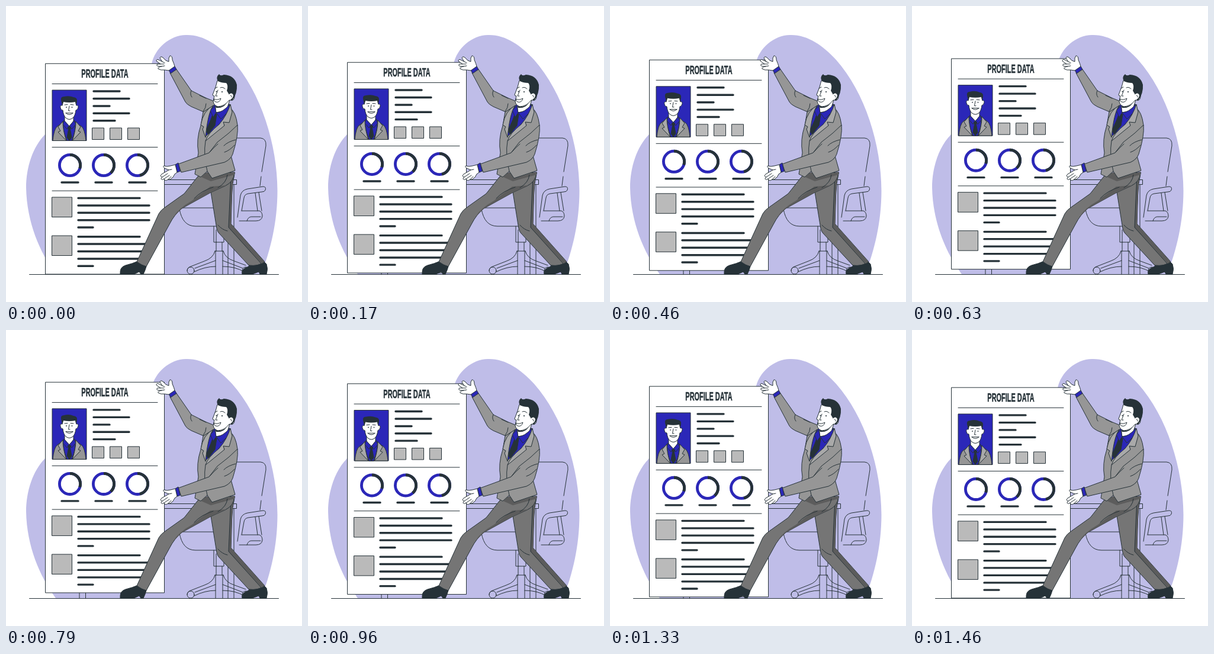
An HTML page that plays this animation: 500 by 500 pixels, repeating every 1.5 s.

```html
<!DOCTYPE html>
<html lang="en">
<head>
<meta charset="utf-8">
<title>Profile data</title>
<style>
  html, body { margin: 0; width: 100%; height: 100%; overflow: hidden; background: #fff; }
  svg { display: block; width: 100%; height: 100%; }
  .ln { fill: none; stroke: #263238; stroke-width: 1; stroke-linecap: round; stroke-linejoin: round; }
  .sh { stroke: #263238; stroke-width: 1; stroke-linejoin: round; }
  .white { fill: #fff; }
  .blue { fill: #2b27b8; }
  .suit { fill: #969696; }
  .lapel { fill: #a9a9a9; }
  .pants { fill: #757575; }
  .shade { fill: #5c5c5c; }
  .box { fill: #bababa; }
  .dark { fill: #263238; }
  .bar { fill: none; stroke: #263238; stroke-width: 3.4; stroke-linecap: round; }
  .ring { fill: none; stroke-width: 4.8; }
  text { font: 700 20.5px "Liberation Sans", Arial, sans-serif; fill: #263238; text-anchor: middle; stroke: #263238; stroke-width: .5; }
</style>
</head>
<body>
<svg viewBox="0 0 500 500">
  <path fill="#bfbde8" d="M304 49C277 49 251 72 246 98C230 170 110 165 66 217C45 238 34 273 34 307C35 365 57 416 84 453H431C447 412 458.500 365 458.500 312C458.500 235 431 146 382 91C359 66 333 48 304 49Z"/>

  <g class="ln" id="office">
    <path d="M268 293.500H389.500V301.500H268M124 440V453M134.500 440V453M375 302V453M385 302V453"/>
    <path d="M386 223H430Q440 224 439 236L432 280M431 288L429 304"/>
    <path d="M391 357L396 320Q398 311 408 309L434 305Q440 305 438 311Q437 314 432 314L409 317Q403 318 402 324L398 346"/>
    <path d="M427 315L432 346M421 316L425 346M398 346H428Q433 348 433 355Q432 363 422 363H394M407 363Q409 355 417 356H430"/>
    <path d="M286 341H356M293 343Q298 372 320 372H384M351 372V399H368V372M355 378V399M355 399V414M365 399V414"/>
    <path d="M353 414Q350 426 335 431L312 440Q306 442 306 447M367 414Q370 426 386 431L405 438M354 430L319 443M366 430L400 443M353 414H367M354 414V453M366 414V453M318 449Q336 440 354 440M366 440Q388 440 402 449"/>
    <circle cx="312" cy="447" r="6"/><circle cx="405" cy="447" r="6"/>
  </g>

  <g id="panel">
    <rect class="sh white" x="66.500" y="97.300" width="201" height="355.700"/>
    <text transform="translate(167 121.200) scale(.535 1)">PROFILE DATA</text>
    <path class="ln" d="M78 131.500H256M78 238.500H256M78 312.200H256"/>

    <g id="portrait">
      <rect class="sh blue" x="78" y="142" width="58" height="85.500"/>
      <path class="sh suit" d="M79 227.500Q81 207 87 203L97 196H116L127 203Q133 207 135 227.500Z"/>
      <path class="sh blue" d="M97 194Q94 206 103 227.500H111Q120 206 116 194Z"/>
      <path class="sh white" d="M99 184V195L107 203L114 195V184Z"/>
      <path class="sh blue" d="M98 193L96 200L103 208L107 203L111 208L118 200L115 193L107 203Z"/>
      <path class="sh dark" d="M104.500 204H109.500L108.500 209L111 222L107 227.500L103 222L105.500 209Z"/>
      <path class="sh lapel" d="M96 195L88 204L92 211L88 213L102 227.500Q96 210 96 195ZM118 195L126 204L122 211L126 213L112 227.500Q118 210 118 195Z"/>
      <path class="sh white" d="M95 168Q91 167 92 172Q93 177 96 176Q97 185 101 189Q107 194 113 189Q117 185 118 176Q121 176 122 171Q122 167 119 168L117 159H97Z"/>
      <path class="dark" d="M95 169L93 159Q92 153 98 153Q107 151 114 154Q121 155 120 161L118.500 169L117 162Q107 164 97 162Z"/>
      <path class="ln" d="M99 167L104 166.500M109 166.500L114 167M107 169L105.500 177H108M101 181Q107 186 113 181Z"/>
      <circle class="dark" cx="102" cy="171" r=".9"/><circle class="dark" cx="111.500" cy="171" r=".9"/>
    </g>

    <path class="bar" d="M148 144H192M148 156.500H208M148 169H175M148 181.300H208M148 193.700H184"/>
    <path class="sh box" d="M145.500 206h20v19.500h-20zM175.500 206h20v19.500h-20zM205.500 206h20v19.500h-20z"/>
    <g id="rings"></g>
    <path class="bar" d="M94 298H122M151 298H179M208 298H236"/>
    <path class="sh box" d="M77.500 323h34v33.500h-34zM77.500 388h34v33.500h-34z"/>
    <path class="bar" d="M122 324.500H226M122 337H242M122 349.300H242M122 361.700H242M122 374H147M122 389.700H226M122 402H242M122 414.500H242M122 427H242M122 439.200H147"/>
  </g>

  <path class="ln" d="M39.500 453.500H460.500"/>

  <g id="man">
    <path class="sh dark" d="M223 431Q214 435 202 438Q193 441 193 449V453H216L225 449L228 453H232Q235 447 237 440Z"/>
    <path class="sh dark" d="M434 430L440 436Q443 444 440 453H429L427 449L416 453H399Q397 446 405 442Q412 440 411 436Z"/>
    <path class="sh pants" d="M346 284L386.500 281Q382 300 381.500 320L380 368L437 432Q426 440 410 438L360 384Q356 380 355 370L346 314Z"/>
    <path class="shade" d="M380 283L386 281.500Q382 300 381.500 320L380 368L436.500 432L432 435L376 374Z"/>
    <path class="ln" d="M380 284L376 374L431 435"/>
    <path class="sh pants" d="M328 283L386 281Q385 297 370 304L346 315L297 342Q284 353 277 367L237 440Q229 438 221 432L258 351Q261 345 270 339L301 317Z"/>
    <path class="shade" d="M283 356Q292 341 314 329L345 305L372 303L346 315L297 342Z"/>
    <path class="shade" d="M330 289L340 280L348 291L386 280V285L346 296Z"/>
    <path class="ln" d="M318 325Q330 312 350 306M374 285Q373 298 358 307M358 370Q365 378 374 380"/>

    <path class="sh suit" d="M288 107L313 143L337 155L359 164L352 192L334 179L313 170Q305 166 303 162L277 113Z"/>
    <path class="ln" d="M313 143Q310 149 314 154M327 151L338 156M333 178Q338 172 338 165"/>

    <path class="sh suit" d="M357 164L378 172Q388 178 391 201Q387 232 380 253L387 278L348 291L340 279L329 289L319 284L325 248Q321 226 329 202L333 179Z"/>
    <path class="sh blue" d="M352 167L341 180L337 220L347 212L374 190L378 166Z"/>
    <path class="sh dark" d="M350 181L356 183L353 202L341 217L338 210L346 192Z"/>
    <path class="sh white" d="M358 160L354 170L354 180L372 177L379 156Z"/>
    <path class="dark" d="M354 168Q362 173 372 165Q367 173 355 172Z"/>
    <path class="sh blue" d="M353 169L345 176L350 188L355 180ZM355 180L363 191L376 178L378 166Q366 180 355 180Z"/>
    <path class="sh lapel" d="M379 166L382 179L377 197L367 196L369 202L337 228Q341 215 360 200Q373 185 379 166ZM350 168Q341 180 337 222L332 208L334 204L329 201Q333 177 350 168Z"/>
    <path class="ln" d="M337 228Q333 252 340 279"/>

    <path class="sh suit" d="M391 201Q393 218 383 250Q380 259 369 264L296 281L291 267L343 248L357 230L376 215Z" stroke="none"/>
    <path class="ln" d="M388 226Q375 229 368 236M358 233Q350 240 344 247M386 235Q378 244 369 247"/>

    <path class="sh blue" d="M275 108L285 102L288 107L278 114ZM286 268L291 265L294.500 279L289 281Z"/>
    <path class="sh white" d="M275 109L268 108Q261 109 257 106Q256 103 263 102L257 102Q253 100 256 98L261 98L254 93Q254 89 258 91L264 94L260 88Q261 84 265 87L270 92L275 94Q274 87 277 84Q281 84 281 91Q284 98 285 102Z"/>
    <path class="ln" d="M263 102L268 101M261 98L267 98M264 94L268 96"/>
    <path class="sh white" d="M286 268L278 270Q271 272 267 270Q264 271 268 274L275 277L263 284Q259 288 264 289L262 291Q262 295 267 292L268 294Q270 296 274 293L277 293Q283 290 285 284L289 281Z"/>
    <path class="ln" d="M264 289L273 283M267 292L276 286M274 293L279 288M275 277L280 276"/>

    <path class="sh white" d="M357 126L354 137L349 150Q349 152 352 152L350 161Q351 168 358 170Q370 169 377 159Q386 161 386 153Q387 147 381 147L382 128Z"/>
    <path class="dark" d="M358 127Q354 120 360 115Q362 119 368 116Q386 117 390 133Q391 148 382 160L379 158L383 151Q381 145 377 150L373 143Q376 134 372 130Q364 130 358 127Z"/>
    <path class="white" d="M377 149Q382 145 384 151Q383 158 377 158Z"/>
    <path class="ln" d="M353 139L357 137M362 138Q366 136 370 140M358 142L354 152H357M351 157Q356 160 363 156Q361 164 354 162Q351 161 351 157M379 151Q381 150 381 154"/>
    <circle class="dark" cx="355.500" cy="144.500" r="1.100"/><circle class="dark" cx="365" cy="145" r="1.100"/>
  </g>
</svg>
<script>
  const LOOP = 1500, STEP = LOOP / 36;
  // [time in ms, lift in px]
  const lift = [[0, 0], [170, 2.1], [460, 6.2], [540, 7.4], [630, 8.4], [750, 9.1],
                [840, 8.3], [960, 6.5], [1080, 4.9], [1170, 3.6], [1460, .1], [1500, 0]];

  const arc = (x, color, share) => {
    const len = 2 * Math.PI * 17.6;
    return `<circle class="ring" cx="${x}" cy="269" r="17.6" stroke="${color}"
      stroke-dasharray="${len * share} ${len}" transform="rotate(-90 ${x} 269)"/>`;
  };
  document.getElementById('rings').innerHTML = [[108, .3], [165, .38], [222, .46]]
    .map(([x, share]) => arc(x, '#2b27b8', 1) + arc(x, '#263238', share)).join('');

  function liftAt(t) {
    const i = lift.findIndex(p => p[0] > t);
    const [t0, a] = lift[i - 1], [t1, b] = lift[i];
    return a + (b - a) * (t - t0) / (t1 - t0);
  }

  const panel = document.getElementById('panel');
  const start = performance.now();
  function draw() {
    const t = (performance.now() - start) % LOOP;
    const held = Math.floor(t / STEP) * STEP;
    panel.setAttribute('transform', `translate(0 ${-liftAt(held).toFixed(2)})`);
    requestAnimationFrame(draw);
  }
  draw();
</script>
</body>
</html>
```
